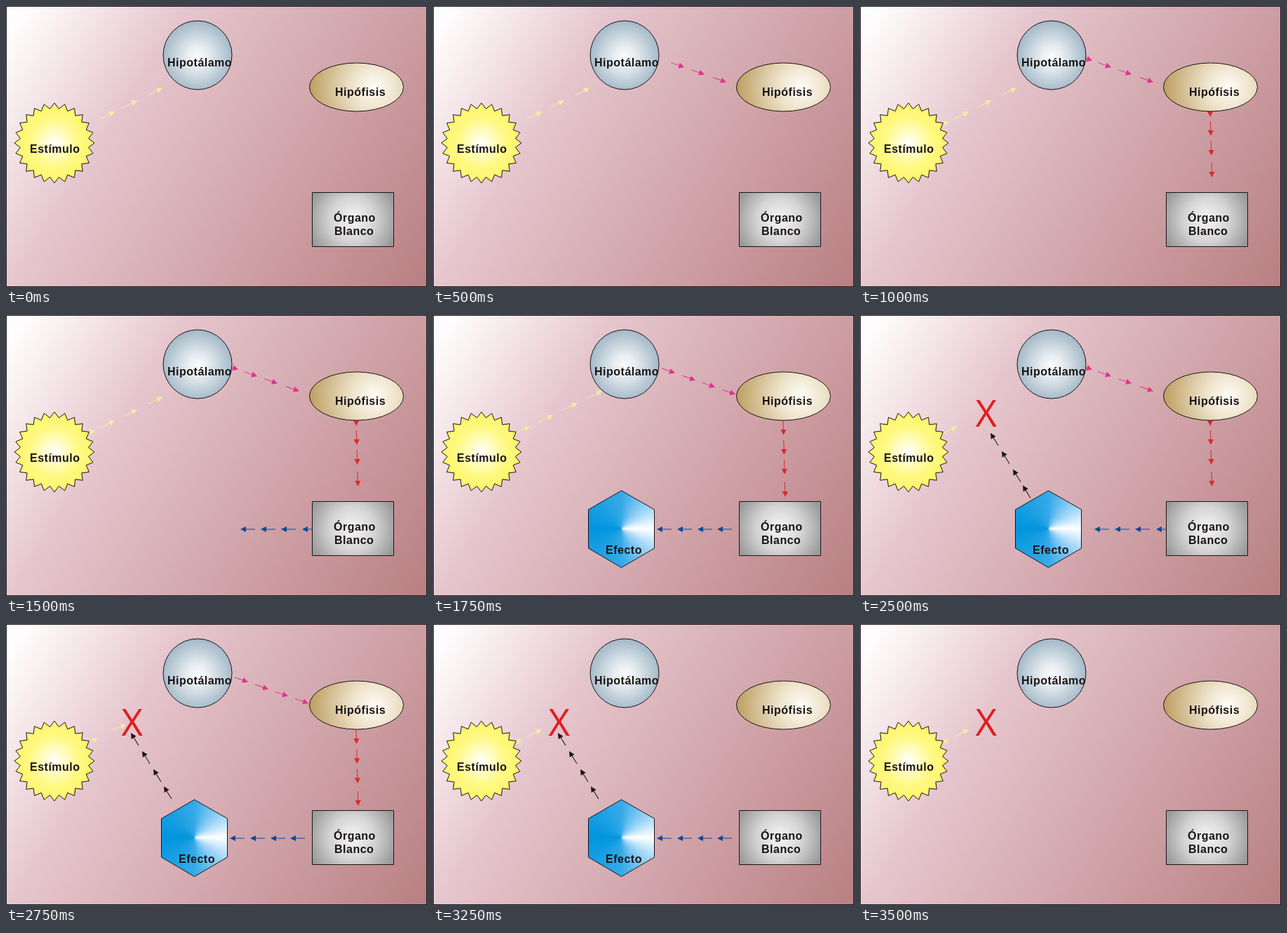
Write an HTML page with a canvas that moves like this. It is 600 by 400 pixels and loops after 3.75 s.

```html
<!DOCTYPE html>
<html lang="es">
<head>
<meta charset="utf-8">
<style>
  html, body { margin: 0; width: 100%; height: 100%; overflow: hidden; }
  canvas { display: block; }
</style>
</head>
<body>
<canvas id="stage" width="600" height="400"></canvas>
<script>
const ctx = document.getElementById('stage').getContext('2d');
const STEP = 250, STEPS = 15;

// Arrow trails: heads sit on the line from -> to, at these x (or y) values on even and odd steps.
const stimulus = { color: '#f3eca0', from: [117, 169], to: [241, 108], length: 23,
  even: [127, 155, 187, 223], odd: [138, 171, 206, 241] };
const trails = [
  { color: '#e0338a', from: [326, 76], to: [431, 113], length: 20, first: 2, last: 11,
    even: [331, 358, 387, 418], odd: [345, 374, 402, 431] },
  { color: '#dc2a2c', from: [499, 150], to: [502, 259], length: 21, first: 4, last: 12,
    even: [158, 185, 213, 244], odd: [171, 199, 227, 259] },
  { color: '#0b4a94', from: [427, 305], to: [319, 305], length: 21, first: 6, last: 13,
    even: [422, 392, 363, 334], odd: [405, 377, 348, 319] },
  { color: '#1a1415', from: [236, 249], to: [178, 155], length: 21, first: 8, last: 13,
    even: [232, 218, 202, 186], odd: [225, 210, 194, 178] }
];
const blocked = { 10: [138], 11: [131, 171], 12: [138, 171], 13: [127, 155], 14: [127, 155] };

function withStops(gradient, stops) {
  stops.forEach(([at, color]) => gradient.addColorStop(at, color));
  return gradient;
}
const radial = (x, y, r, ...stops) => withStops(ctx.createRadialGradient(x, y, 0, x, y, r), stops);

const paint = {
  back: withStops(ctx.createLinearGradient(0, 0, 614, 383),
    [[0, '#fff'], [0.04, '#fefcfc'], [0.3, '#e6c6ce'], [1, '#b97f82']]),
  sun: radial(69, 195, 57, [0, '#fff'], [0.15, '#fffde0'], [0.6, '#fff985'], [1, '#fff566']),
  disc: radial(273, 72, 52, [0, '#fbfcfd'], [0.3, '#e6ecf0'], [1, '#a0b6c5']),
  oval: radial(525, 116, 92, [0, '#fffdf8'], [0.35, '#eee3cb'], [1, '#bd9f62']),
  box: radial(494, 304, 64, [0, '#f6f6f6'], [0.5, '#d4d4d4'], [1, '#9a9a9a']),
  hexagon: withStops(ctx.createConicGradient(0, 268.5, 304), [
    [0, '#fff'], [0.1, '#a3d7f8'], [0.25, '#35a9e8'], [0.5, '#0095dd'],
    [0.75, '#35a9e8'], [0.9, '#a3d7f8'], [1, '#fff']])
};

function shape(fill, trace) {
  ctx.beginPath();
  trace();
  ctx.closePath();
  ctx.fillStyle = fill;
  ctx.fill();
  ctx.strokeStyle = '#1a1415';
  ctx.lineWidth = 1;
  ctx.stroke();
}

function label(text, x, y) {
  ctx.font = 'bold 16px "Liberation Sans", Arial, sans-serif';
  ctx.letterSpacing = '0.5px';
  ctx.fillStyle = '#1a1415';
  ctx.fillText(text, x, y);
}

function arrow(x, y, angle, length, color) {
  ctx.save();
  ctx.translate(x, y);
  ctx.rotate(angle);
  ctx.strokeStyle = ctx.fillStyle = color;
  ctx.lineWidth = 1;
  ctx.beginPath();
  ctx.moveTo(-length, 0);
  ctx.lineTo(-5, 0);
  ctx.stroke();
  ctx.beginPath();
  ctx.moveTo(0, 0);
  ctx.lineTo(-8, -4);
  ctx.lineTo(-8, 4);
  ctx.fill();
  ctx.restore();
}

function drawTrail({ color, from, to, length }, heads) {
  const dx = to[0] - from[0], dy = to[1] - from[1];
  const axis = Math.abs(dx) > Math.abs(dy) || color === '#1a1415' ? 0 : 1;
  for (const head of heads) {
    const t = (head - from[axis]) / (to[axis] - from[axis]);
    arrow(from[0] + dx * t, from[1] + dy * t, Math.atan2(dy, dx), length, color);
  }
}

function star() {
  for (let i = 0; i < 48; i++) {
    const r = i % 2 ? 49 : 57, a = i * Math.PI / 24;
    ctx.lineTo(69 + r * Math.cos(a), 195 + r * Math.sin(a));
  }
}

function hexagon() {
  [[268.5, 250], [315.5, 277], [315.5, 332], [268.5, 359.5], [221.5, 332], [221.5, 277]]
    .forEach(([x, y]) => ctx.lineTo(x, y));
}

function draw(step) {
  const phase = step % 2 ? 'odd' : 'even';
  const headsOf = trail => step < 4 && phase === 'even' ? trail.even.slice(1) : trail[phase];

  shape(paint.back, () => ctx.rect(0.5, 0.5, 599, 399));
  drawTrail(stimulus, blocked[step] || headsOf(stimulus));
  for (const trail of trails) {
    if (step >= trail.first && step <= trail.last) drawTrail(trail, headsOf(trail));
  }

  shape(paint.sun, star);
  shape(paint.disc, () => ctx.arc(273, 70, 49, 0, 7));
  shape(paint.oval, () => ctx.ellipse(499.5, 115.5, 67, 34.5, 0, 0, 2 * Math.PI));
  shape(paint.box, () => ctx.rect(436.5, 265.5, 116, 77));
  label('Estímulo', 34, 209);
  label('Hipotálamo', 230, 86);
  label('Hipófisis', 469, 128);
  label('Órgano', 467, 307);
  label('Blanco', 468, 326);

  if (step >= 7 && step <= 13) {
    shape(paint.hexagon, hexagon);
    label('Efecto', 246, 340);
  }
  if (step >= 10) {
    ctx.font = '53px "Open Sans", sans-serif';
    ctx.letterSpacing = '0px';
    ctx.fillStyle = '#e01e1e';
    ctx.fillText('X', 164.5, 159);
  }
}

function tick() {
  draw(Math.floor(performance.now() / STEP) % STEPS);
  requestAnimationFrame(tick);
}
tick();
</script>
</body>
</html>
```
